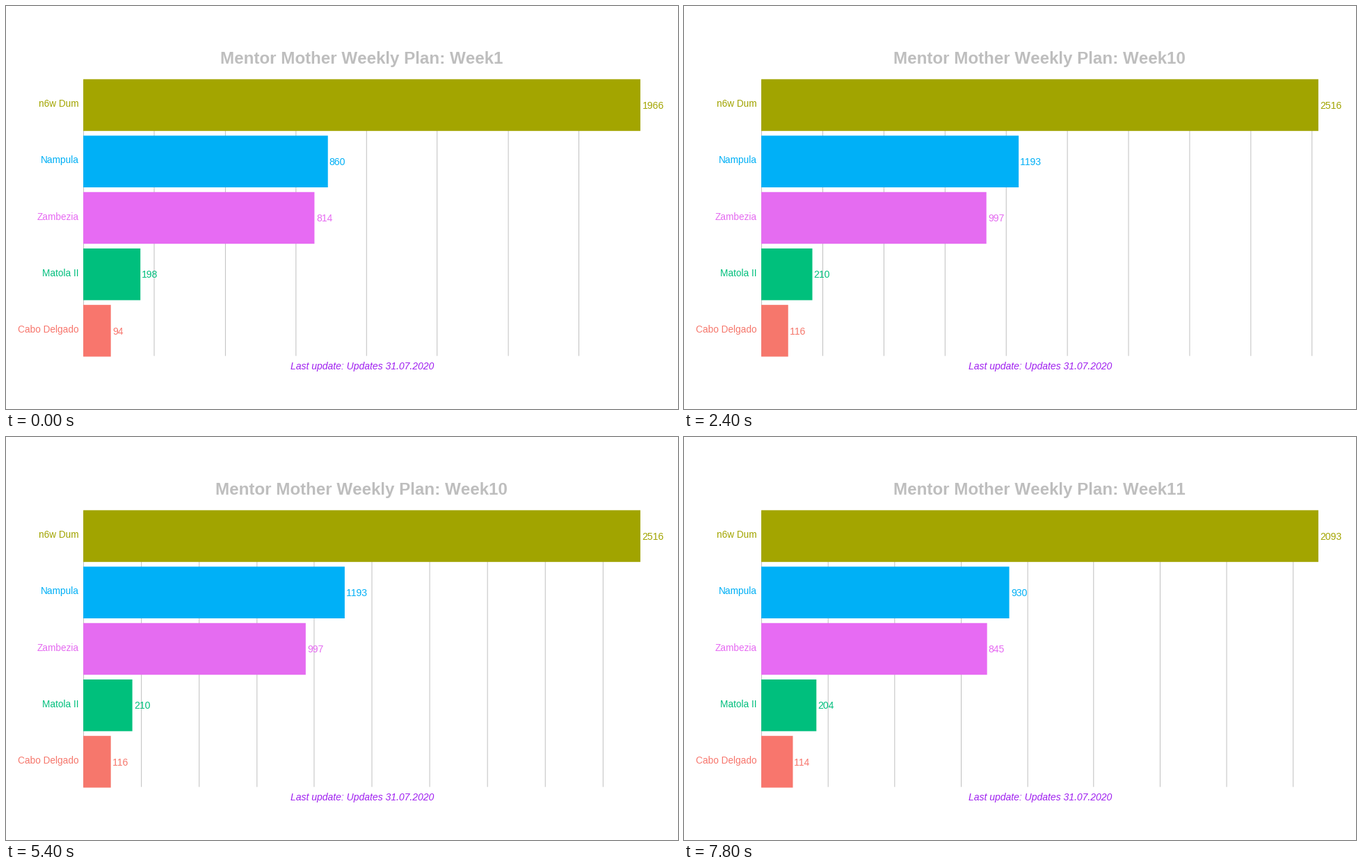
A matplotlib script that plays this animation: 966 by 580 pixels, repeating every 8000 ms.

```python
from math import floor

import matplotlib.pyplot as plt
from matplotlib.animation import FuncAnimation
from matplotlib.patches import Rectangle

# The chart is laid out on a 1000 x 600 canvas and shown slightly reduced.
W, H, DPI = 966, 580, 100
CANVAS_W, CANVAS_H = 1000, 600
UNIT = W / CANVAS_W * 72 / DPI       # one canvas unit in points
LEFT, SPAN = 115.45, 828             # the longest bar always fills SPAN
ROW_TOP, ROW_STEP, BAR_HEIGHT = 109, 84, 77
GRID_STEP, MAX_LINES = 250, 11
FRAMES, INTERVAL = 40, 200
FIRST_HOLD, MOVE, CYCLE = 3, 16, 20  # in frames

NAMES = ["n6w Dum", "Nampula", "Zambezia", "Matola II", "Cabo Delgado"]
REST_COLORS = ["#A3A500", "#00B0F6", "#E76BF3", "#00BF7D", "#F8766D"]
MOVE_COLORS = ["#A1A400", "#00B0F7", "#E56CF1", "#00C07C", "#F6776C"]
STATES = [
    ("Week1", [1966, 860, 814, 198, 94]),
    ("Week10", [2516, 1193, 997, 210, 116]),
    ("Week11", [2093, 930, 845, 204, 114]),
]

plt.rcParams["font.family"] = "Liberation Sans"
plt.rcParams["text.kerning_factor"] = 6  # no kerning

fig = plt.figure(figsize=(W / DPI, H / DPI), dpi=DPI, facecolor="white")
ax = fig.add_axes([0, 0, 1, 1])
ax.set_xlim(0, CANVAS_W)
ax.set_ylim(CANVAS_H, 0)
ax.axis("off")


def label(x, y, text, size, color, **style):
    return ax.text(x, y, text, fontsize=size * UNIT, color=color,
                   va="baseline", zorder=3, **style)


title = label(529, 86, "", 25, "#BEBEBE", ha="center", weight="bold")
label(423, 541, "Last update: Updates 31.07.2020", 14.5, "#A020F0",
      ha="left", style="italic")

grid = [ax.plot([LEFT, LEFT], [111, 521], color="#BEBEBE", lw=UNIT, zorder=1,
                solid_capstyle="butt", snap=False)[0]
        for _ in range(MAX_LINES)]

bars, names, values = [], [], []
for row, (name, color) in enumerate(zip(NAMES, REST_COLORS)):
    y = ROW_TOP + ROW_STEP * row
    mid = y + BAR_HEIGHT / 2
    bars.append(ax.add_patch(Rectangle(
        (floor(LEFT), y), 0, BAR_HEIGHT, color=color, lw=0, zorder=2,
        snap=False)))
    names.append(label(108.2, mid + 2.7, name, 14.1, color, ha="right"))
    values.append(label(LEFT, mid + 5.3, "", 14.5, color, ha="left"))


def progress(frame):
    """Index of the state being left and the share of the move done."""
    state, step = divmod(max(frame - FIRST_HOLD, 0), CYCLE)
    return state, min(step / MOVE, 1)


def draw(frame):
    state, share = progress(frame)
    start, end = STATES[state][1], STATES[state + 1][1]
    week, shown = STATES[state + (share >= 0.5)]
    colors = MOVE_COLORS if 0 < share < 1 else REST_COLORS
    current = [a + (b - a) * share for a, b in zip(start, end)]
    top = max(current)
    scale = SPAN / top

    title.set_text(f"Mentor Mother Weekly Plan: {week}")
    for i, line in enumerate(grid):
        x = floor(LEFT + i * GRID_STEP * scale) + 0.5
        line.set_xdata([x, x])
        line.set_visible(i * GRID_STEP <= top)
    for bar, name, text, value, number, color in zip(
            bars, names, values, current, shown, colors):
        tip = LEFT + value * scale
        bar.set_width(round(tip) + 1 - floor(LEFT))
        bar.set_color(color)
        name.set_color(color)
        text.set(x=tip + 3.3, text=str(number), color=color)
    return [title, *grid, *bars, *names, *values]


anim = FuncAnimation(fig, draw, frames=FRAMES, interval=INTERVAL,
                     repeat=True, repeat_delay=0, blit=False)
plt.show()
```
